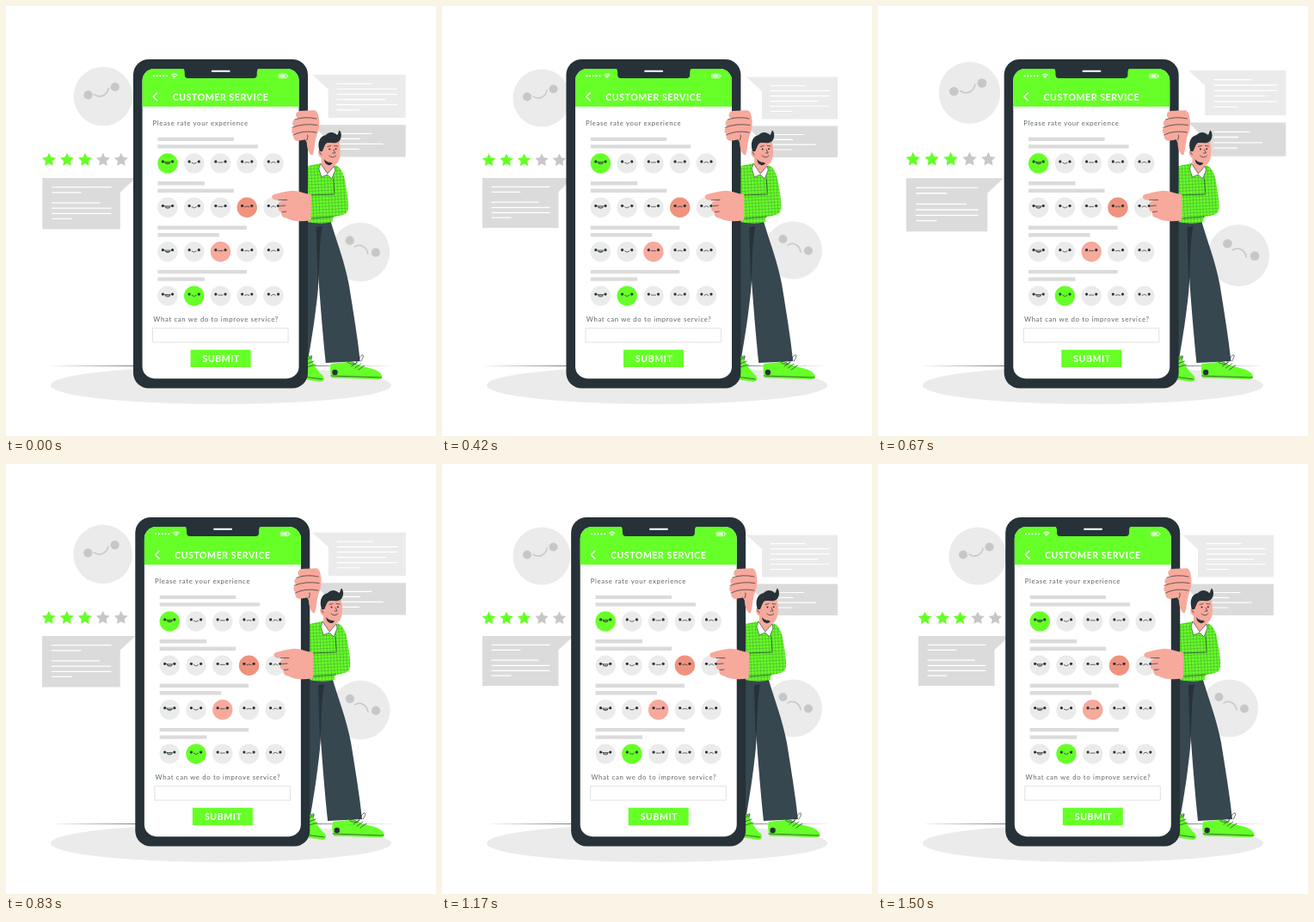
Animation, 500 px wide and 500 px high, one loop 1.54 s. Source, as an HTML page:

```html
<!DOCTYPE html>
<html lang="en">
<head>
<meta charset="utf-8">
<title>Customer service survey</title>
<style>
  html, body { margin: 0; height: 100%; overflow: hidden; background: #fff; }
  svg { display: block; width: 100vw; height: 100vh; }
  text { font-family: Lato, sans-serif; }
  .label { font-size: 7.8px; letter-spacing: .64px; fill: #5c666b; }
  .caps { font-size: 10.5px; font-weight: 700; letter-spacing: .6px; fill: #fff; }
  .green { fill: #66ff28; }
  .dark { fill: #263238; }
  .skin { fill: #f7a99c; }
  .pale { fill: #ebebeb; }
  .grey { fill: #dbdbdb; }
  .mid { fill: #c7c7c7; }
  .ink, .chalk, .arc { fill: none; stroke-linecap: round; stroke-linejoin: round; }
  .ink { stroke: #263238; stroke-width: .7; }
  .chalk { stroke: #fff; stroke-width: 1.2; }
  .arc { stroke: #c7c7c7; stroke-width: 1.5; }
  .fingers { fill: none; stroke: #f7a99c; stroke-width: 9.4; stroke-linecap: round; }
</style>
</head>
<body>
<svg viewBox="0 0 500 500">
  <defs>
    <pattern id="check" width="3.7" height="3.7" patternUnits="userSpaceOnUse" patternTransform="rotate(-3)">
      <rect width="3.7" height="3.7" class="green"/>
      <path d="M0 .5H3.7M.5 0V3.7" stroke="#263238" stroke-width=".4" opacity=".6"/>
    </pattern>
    <clipPath id="screen"><rect x="158.8" y="73" width="182" height="360.2" rx="14"/></clipPath>
  </defs>

  <ellipse class="pale" cx="250" cy="441" rx="198" ry="22"/>

  <g id="feedback">
    <circle class="pale" cx="116" cy="107" r="33.5"/>
    <circle class="mid" cx="99" cy="105.5" r="5"/>
    <circle class="mid" cx="129.5" cy="96.5" r="5"/>
    <path class="arc" d="M106 105C113 110 121 105 122 98"/>
    <circle class="pale" cx="408.5" cy="284" r="33.5"/>
    <circle class="mid" cx="396.5" cy="271" r="5"/>
    <circle class="mid" cx="426" cy="284.5" r="5"/>
    <path class="arc" d="M402 278C408 274 416 278 417 286"/>
    <path class="grey" d="M47 200H153L135.5 216V258H47Z"/>
    <path class="pale" d="M354 82.5H460V131.5H372V99Z"/>
    <path class="grey" d="M354 139.5H460V176H372V157Z"/>
  </g>

  <g id="scene">
    <path class="dark" d="M50 418.5L250 418 452 418.5 250 419.2Z"/>

    <g id="man">
      <path class="green" d="M346 406L354 407C357 416 362 424 369 430Q372 436 366 437L346 434Z"/>
      <path class="ink" d="M346 431L368 434M350 412L356 408M350 416L358 413M350 420L360 417M352 409Q358 403 355 411"/>
      <path fill="#37474f" d="M346 250H366L363 330C360 360 356 385 352 408L346 406Z"/>
      <path fill="#37474f" d="M353 250L378 251C384 272 394 297 399 324C404 355 409 385 412 413L372 415C369 386 366 350 364 322L360 260Z"/>
      <path class="dark" d="M361 257L368 256C364 277 365 298 363 328Z"/>
      <path class="green" d="M378 416L397 414C403 414 408 416 413 418.5C422 421 434 422 437.5 430Q438 434 433 434L379 432.5Q376 424 378 416Z"/>
      <path class="ink" d="M378 430L437 432M402 419L409 414M406 421L413 416M410 423L417 418M405 415C393 410 397 418 407 416C412 404 420 402 413 413"/>
      <circle class="dark" cx="382.7" cy="426" r="3.2"/>

      <path fill="url(#check)" d="M346 187L366 183 375 197 383 185C389 187 392 193 394 201C396 213 399 228 398 237C396 244 388 243 380 246V251Q365 255 346 250Z"/>
      <path class="ink" d="M355 220L382 219M381 201L382 217M355 247L381 245"/>
      <path class="skin" d="M367 172L367 186 374 196 382 187V178Z"/>
      <path d="M366 183L374 195 382 186 383 191 379 201 374 196 367 199 364 189Z" fill="#fff" stroke="#263238" stroke-width=".6"/>
      <path class="skin" d="M365 162C366 151 387 150 388 160C390 170 389 180 384 184C379 188 371 185 368 177C362 175 362 166 366 167Z"/>
      <path class="dark" d="M365 169C362 160 364 152 372 150C376 145 383 147 385 150C387 149 386 147 388 144.5C392 149 390 158 384 159C378 160 373 157 371 162L368 169ZM370 178C374 183 378 181 380 183Q375 188 371 182Z"/>
      <circle class="dark" cx="376.5" cy="166.5" r="1"/>
      <circle class="dark" cx="383.8" cy="166.2" r="1"/>
      <path class="ink" d="M374 163.5L378 162.5M382 162.5L386 163M381 167L383 171 380 171M376 174Q380 178 384 174M365 170L367 173"/>
    </g>

    <rect class="dark" x="148.2" y="62" width="203" height="382.5" rx="18"/>
    <g clip-path="url(#screen)">
      <path fill="#fff" d="M158 73H342V434H158Z"/>
      <path class="green" d="M158 73H342V117H158Z"/>
      <path class="dark" d="M205 72Q208 73 208 77V80Q208 84 212 84H288Q292 84 292 80V77Q292 73 295 72Z"/>
    </g>
    <path class="chalk" d="M240 75.8H260" style="stroke-width:2"/>
    <path class="chalk" d="M172 81.3H187.6" style="stroke-width:2.2" stroke-dasharray=".01 3.8"/>
    <path class="chalk" d="M192.8 80.4Q195.8 78 198.8 80.4M194.3 82Q195.8 80.8 197.3 82M195.8 83.4V83.4"/>
    <rect x="317.2" y="79.2" width="9.6" height="4.4" rx="1" fill="none" stroke="#fff" stroke-width=".8"/>
    <path fill="#fff" d="M318.2 80.2H325V82.6H318.2ZM327.4 80.4H328.3V82.4H327.4Z"/>
    <path class="chalk" d="M176 101L171.5 105.5 176 110" style="stroke-width:1.5"/>
    <text class="caps" x="194" y="109.9">CUSTOMER SERVICE</text>
    <text class="label" x="170.8" y="139">Please rate your experience</text>
    <g id="survey"></g>
    <text class="label" x="171.5" y="367.3">What can we do to improve service?</text>
    <rect x="170.8" y="374.7" width="157.5" height="16.3" fill="#fff" stroke="#dedede" stroke-width=".9"/>
    <rect class="green" x="214.8" y="399.7" width="70" height="20.3"/>
    <text class="caps" x="228.8" y="414">SUBMIT</text>

    <path class="skin" d="M345 128C352 120 360 121 363 126C366 136 364 145 361 152C359 160 359 167 357 173C354 175 350 167 350 159C346 152 345 140 345 128Z"/>
    <path class="fingers" d="M342 126.8L358 126M338 136.3L358 134M337 145L357 142M339 152L351 150"/>
    <path class="ink" d="M336 132Q348 128 361 131M333 141.3Q346 136 362 138.5M334 150Q346 144 361 147M350 156Q352 152 351 150"/>
    <path class="skin" d="M355 219C345 218 339 214 331 215C324 216 317 217.5 312 219C308 220.5 309 224.5 313 225.5L322 226C316 228 316 231 319 232.5C315 235 317 239 321 239.5C319 242 322 246.5 326 246.5C334 251 345 251 355 249Z"/>
    <path class="ink" d="M317 225.7L327 225.5M319 232.5L325 232M321 239.5L326 239"/>
  </g>
</svg>
<script>
const LOOP = 1540, CYCLE = 1500, LEAD = 33;
const feedback = document.getElementById('feedback');
const scene = document.getElementById('scene');
const add = (parent, markup) => parent.insertAdjacentHTML('beforeend', markup);

// White text lines of a bubble: [y, right end]
const textLines = (x, lines) =>
  add(feedback, `<path class="chalk" d="${lines.map(([y, end]) => `M${x} ${y}H${end}`).join('')}"/>`);
textLines(58, [[210.3, 125], [216.3, 91], [228.2, 112], [234.3, 125], [240.3, 125], [246.2, 80]]);
textLines(382, [[92.7, 422], [98.7, 450], [104.6, 450], [110.6, 437], [116.5, 450], [122.5, 407]]);
textLines(382, [[149.5, 421], [155.3, 408], [161.2, 434], [167, 407]]);

const starPoints = Array.from({ length: 10 }, (_, i) => {
  const r = i % 2 ? 4 : 8.1, a = i * Math.PI / 5;
  return `${(r * Math.sin(a)).toFixed(2)},${(-r * Math.cos(a)).toFixed(2)}`;
}).join(' ');
for (let i = 0; i < 5; i++)
  add(feedback, `<polygon class="${i < 3 ? 'green' : 'mid'}" points="${starPoints}" transform="translate(${54.5 + i * 20.5} 179.5)"/>`);

// Survey rows: widths of both bars, chosen face and its colour
const GREEN = '#66ff28';
const rows = [
  [88.5, 116.5, 0, GREEN], [54.5, 88.5, 3, '#ef937f'],
  [103.5, 71.5, 2, '#f7a99c'], [103.5, 54.5, 1, GREEN]
];
const mouths = [
  'M-3.2-1.6H3.2Q2.6 1 0 1T-3.2-1.6M-2.5-.2H2.5', 'M-2.6-.6Q0 1.8 2.6-.6', 'M-2.6-1H2.6',
  'M-2.6-.8Q0-2.2 2.6-.8', 'M-2.6-.4Q0-3.2 2.6-.4'
];
const survey = document.getElementById('survey');
rows.forEach(([first, second, chosen, colour], row) => {
  const y = 152.7 + row * 51.4;
  add(survey, `<path class="grey" d="M176.6 ${y}h${first}v4.4h${-first}zm0 8.5h${second}v4.4h${-second}z"/>`);
  mouths.forEach((mouth, i) => add(survey,
    `<g transform="translate(${188.2 + i * 30.75} ${y + 30.2})">
      <circle r="11.7" fill="${i === chosen ? colour : '#ebebeb'}"/>
      <circle class="dark" cx="-5.6" cy="-2" r="1.6"/><circle class="dark" cx="5.6" cy="-2" r="1.6"/>
      <path class="ink" d="${mouth}"/></g>`));
});

// Linear interpolation through [position, value] stops
function track(stops, p) {
  const i = Math.max(1, stops.findIndex(([at]) => at >= p));
  const [a, from] = stops[i - 1], [b, to] = stops[i];
  return from + (to - from) * (p - a) / (b - a);
}
const heartbeat = [[0, 1], [.1, 1.1], [.3, 1], [.4, 1], [.5, 1.1], [.6, 1], [1, 1]];
const shake = [0, -1, 2, -4, 4, -4, 4, -4, 2, -1, 0].map((x, i) => [i / 10, x]);

function draw(time) {
  const p = Math.min(1, (time % LOOP + LEAD) / CYCLE);
  feedback.setAttribute('transform',
    `translate(253.5 195.5) scale(${track(heartbeat, p)}) translate(-253.5 -195.5)`);
  scene.setAttribute('transform', `translate(${track(shake, p)})`);
}

const start = performance.now();
function tick() {
  draw(performance.now() - start);
  requestAnimationFrame(tick);
}
tick();
</script>
</body>
</html>
```
